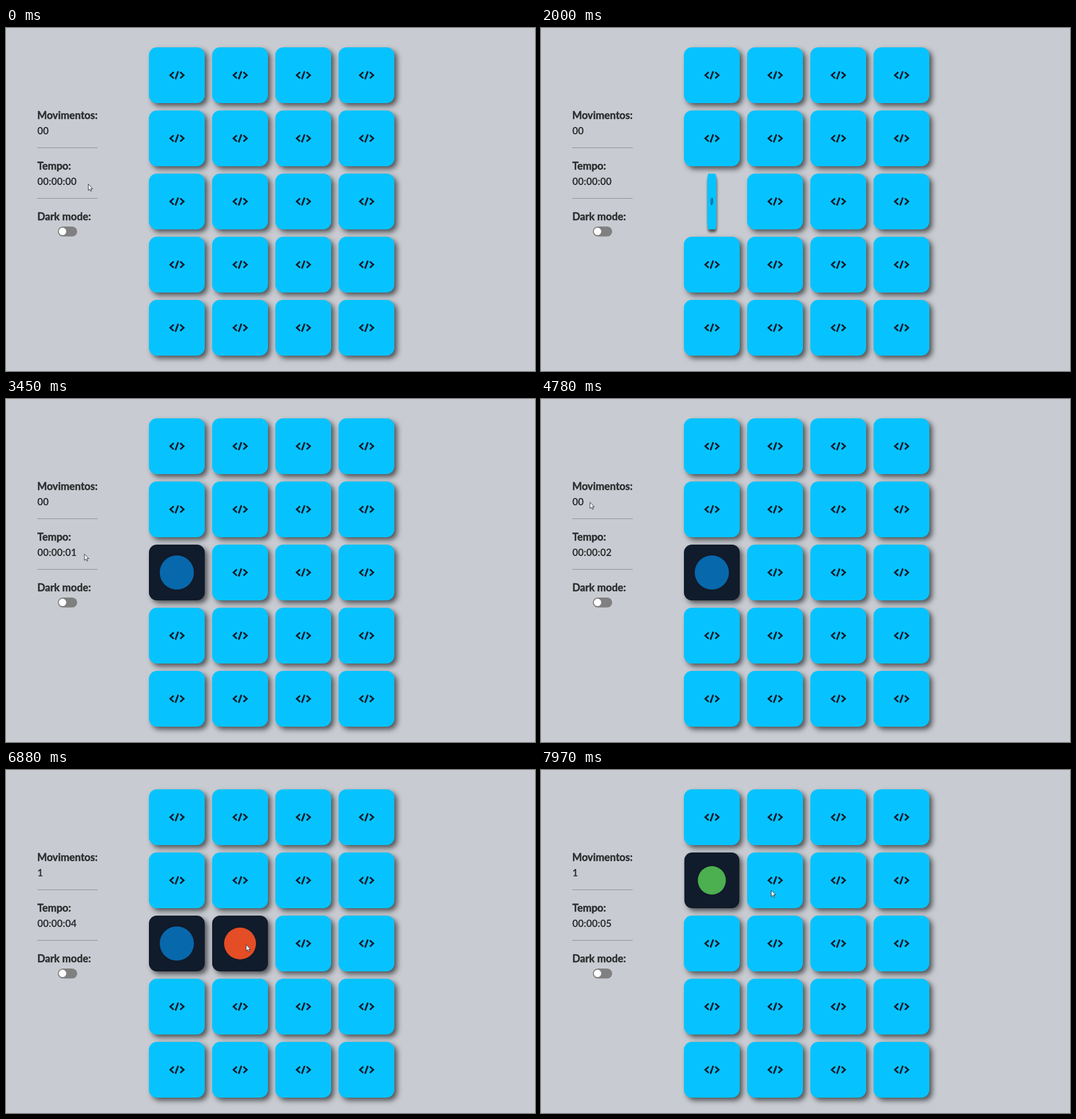
Recreate the animation shown at these times as an HTML page. Size 929 px wide and 603 px high, loop 8000 ms.

```html
<!DOCTYPE html>
<html lang="pt">
<head>
<meta charset="utf-8">
<style>
html, body { margin: 0; width: 100%; height: 100%; overflow: hidden; background: #c8ccd2; }
.card {
  position: absolute; width: 98px; height: 98px; border-radius: 14px;
  background: #06c3ff; box-shadow: 5px 5px 10px rgba(0, 0, 0, .6);
}
.card path { fill: none; stroke: #111c2e; stroke-width: 3; }
.card circle { display: none; }
.card.back { background: #101b2b; }
.card.back path { display: none; }
.card.back circle { display: inline; }
#panel { position: absolute; left: 0; top: 0; z-index: 1; }
text { font: 700 17.3px Lato, sans-serif; fill: #2e2f31; }
.title { font-size: 18.2px; stroke: #2e2f31; stroke-width: .5px; }
</style>
</head>
<body>
<svg id="panel" width="929" height="603">
  <text class="title" x="54.8" y="160">Movimentos:</text>
  <text id="moves" x="55" y="187">00</text>
  <text class="title" x="55" y="249">Tempo:</text>
  <text id="time" x="55" y="276">00:00:00</text>
  <text class="title" x="55" y="338">Dark mode:</text>
  <path d="M55 210.5H161M55 299.5H161" stroke="#8b8e92"/>
  <rect x="91" y="349" width="34" height="17.5" rx="8.75" fill="#808080"/>
  <circle cx="99.3" cy="357.6" r="6.5" fill="#fff"/>
  <path id="arrow" d="M.5 .5V11.5L3 9.2L4.8 13L6.5 12.2L4.8 8.5H8.2Z" fill="#fff" stroke="#23262c" stroke-width=".9"/>
</svg>
<script>
const LOOP = 8000, FLIP = 500;
const CLICK1 = 1867, CLICK2 = 5907, CLOSE = 6945, CLICK3 = 7615;
const $ = id => document.getElementById(id);

const flips = {
  4: { color: '#4caf50', r: 25, open: CLICK3, close: Infinity },
  8: { color: '#0868ac', r: 30, open: CLICK1, close: CLOSE },
  9: { color: '#e44d26', r: 28, open: CLICK2, close: CLOSE }
};

// Pointer tip: time, x, y
const path = [
  [500, 144, 274], [700, 169, 230], [1380, 123, 296], [1590, 288, 284],
  [2560, 240, 287], [3120, 128, 259], [3450, 137, 272], [3700, 194, 293],
  [4250, 152, 172], [4600, 69, 176], [4780, 85.5, 181], [5140, 90, 181],
  [5560, 436, 316.5], [6810, 436, 316.5], [7230, 349, 258], [7600, 318, 212],
  [7970, 404, 211]
];

const cards = Array.from({ length: 20 }, (_, i) => {
  const card = document.createElement('div');
  const { color, r } = flips[i] || { color: 'none', r: 0 };
  card.className = 'card';
  card.style.left = 251 + i % 4 * 111 + 'px';
  card.style.top = 34 + (i >> 2) * 111 + 'px';
  card.innerHTML = `<svg width="98" height="98">
    <path d="M43.5 43.5L37.5 49L43.5 54.5M51.5 42L46.5 56M55 43.5L61 49L55 54.5"/>
    <circle cx="49" cy="49" r="${r}" fill="${color}"/></svg>`;
  document.body.append(card);
  return card;
});

const clamp = x => Math.min(1, Math.max(0, x));
const bezier = (s, a, b) => 3 * s * (1 - s) ** 2 * a + 3 * s * s * (1 - s) * b + s ** 3;

// CSS "ease" curve
function ease(x) {
  let lo = 0, hi = 1;
  for (let i = 0; i < 20; i++) {
    const mid = (lo + hi) / 2;
    if (bezier(mid, .25, .25) < clamp(x)) lo = mid; else hi = mid;
  }
  return bezier(hi, .1, 1);
}

function pointer(t) {
  const i = Math.max(1, path.findIndex(p => p[0] > t));
  const [t0, x0, y0] = path[i - 1], [t1, x1, y1] = path[i];
  const k = clamp((t - t0) / (t1 - t0));
  return [x0 + (x1 - x0) * k, y0 + (y1 - y0) * k];
}

function frame() {
  const t = performance.now() % LOOP;

  for (const i in flips) {
    const { open, close } = flips[i];
    const turn = ease((t - open) / FLIP) - ease((t - close) / FLIP);
    const width = Math.cos(turn * Math.PI);
    cards[i].classList.toggle('back', width < 0);
    cards[i].style.transform = `scaleX(${Math.abs(width)})`;
  }

  $('time').textContent = '00:00:0' + Math.max(0, Math.floor(t / 1000) - 2);
  $('moves').textContent = t < CLICK2 ? '00' : '1';

  const tip = pointer(Math.min(t, path.at(-1)[0] - 1));
  $('arrow').setAttribute('transform', `translate(${tip})`);
  $('arrow').style.display = t >= CLICK1 && t < CLICK1 + FLIP ? 'none' : '';
  requestAnimationFrame(frame);
}
frame();
</script>
</body>
</html>
```
